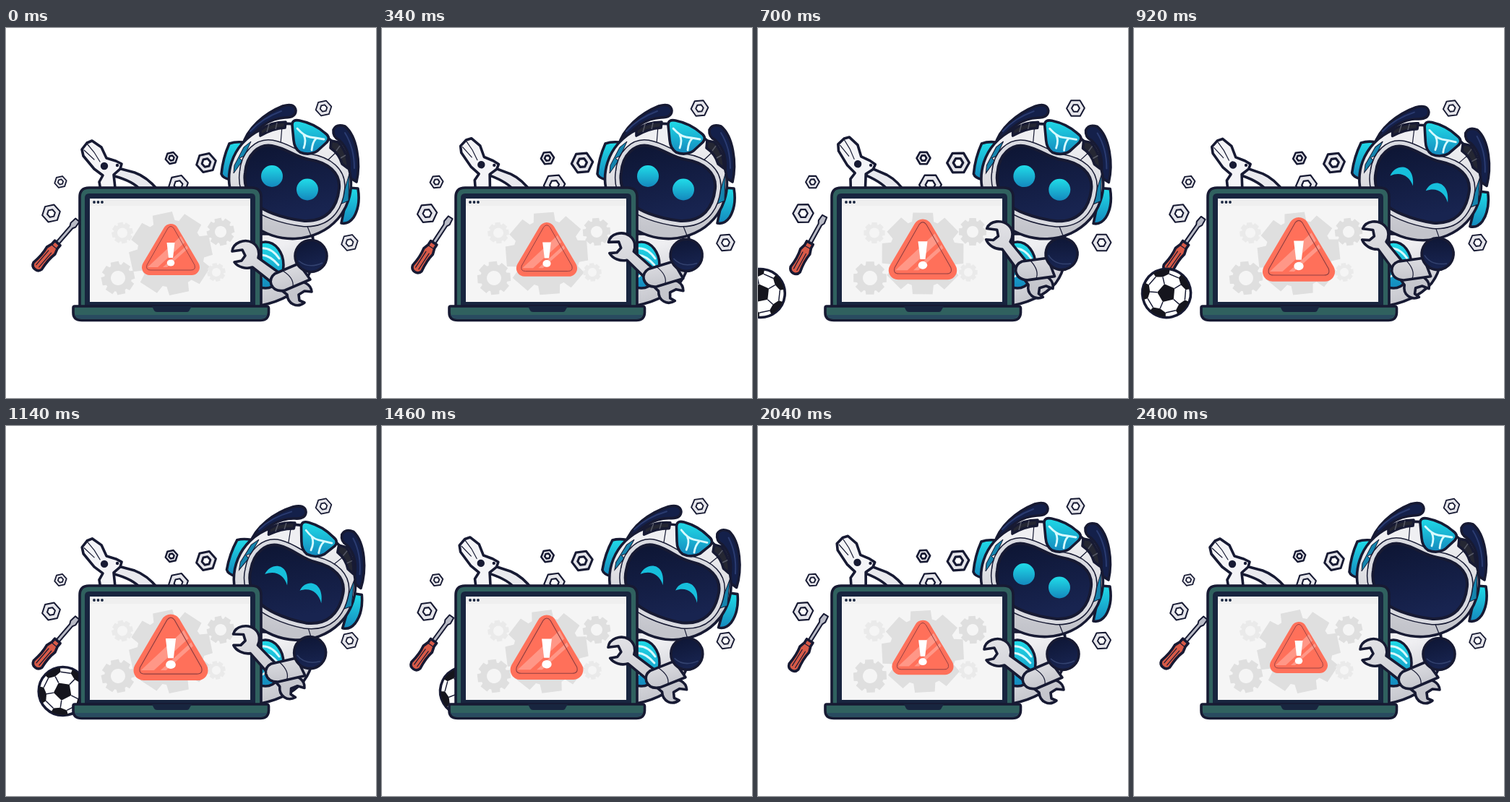
An HTML page that plays this animation: 512 px wide and 512 px high, repeating every 2420 ms.

```html
<!DOCTYPE html>
<html lang="en">
<head>
<meta charset="utf-8">
<style>
  html, body { margin: 0; width: 100%; height: 100%; overflow: hidden; background: #fff; }
  svg { display: block; width: 100vw; height: 100vh; }
  .ink { stroke: #171a33; stroke-width: 3.6; stroke-linejoin: round; stroke-linecap: round; }
  .thin { stroke-width: 2; }
  .line { fill: none; stroke: #171a33; stroke-width: 1.2; stroke-linecap: round; }
  .shine { fill: none; stroke: #d8fbff; stroke-width: 2.8; stroke-linecap: round; stroke-linejoin: round; }
</style>
</head>
<body>
<svg viewBox="0 0 512 512">
  <defs>
    <linearGradient id="cyan" x2="0" y2="1"><stop stop-color="#20dce8"/><stop offset="1" stop-color="#1488bd"/></linearGradient>
    <linearGradient id="shell" x2=".35" y2="1"><stop offset=".3" stop-color="#efeff2"/><stop offset="1" stop-color="#c3c4cb"/></linearGradient>
    <linearGradient id="steel" x2=".4" y2="1"><stop stop-color="#e4e4e8"/><stop offset="1" stop-color="#c4c5cc"/></linearGradient>
    <linearGradient id="navy" x2=".3" y2="1"><stop stop-color="#0d1533"/><stop offset="1" stop-color="#182450"/></linearGradient>
    <clipPath id="ballClip"><circle r="33"/></clipPath>
    <path id="face" d="M331 200C333 175 350 160 368 163C390 167 400 179 420 182C445 186 463 200 461 222C458 250 443 268 413 267C385 264 350 253 340 237C331 223 329 212 331 200Z"/>
  </defs>

  <g id="nuts"></g>

  <g id="driver">
    <path class="ink thin" fill="#b9bbc6" d="M0-2.500H31L35-4.500 44-3.500V3.500L35 4.500 31 2.500H0Z"/>
    <path class="ink" fill="#d85a48" d="M-40-7.500Q-24-5-12-7.500L-4-5H2V5H-4L-12 7.500Q-24 5-40 7.500Q-46 6-46 0Q-46-6-40-7.500Z"/>
    <path class="line" d="M-5-5V5M-40-2.500H-14M-40 2.500H-14"/>
  </g>

  <g id="pliers">
    <path class="ink" fill="#e9e9ee" d="M148 192L178 200Q195 206 210 224H186Q176 212 150 205Z"/>
    <path class="ink" fill="#f4f4f7" d="M112 159L119 156 132 165 139 180 152 184 160 188 158 195 149 203 152 230H132L129 213 134 204 122 195 107 177 105 168Z"/>
    <path class="line" d="M112 160L122 172 130 185M108 169L122 182"/>
    <circle cx="136" cy="191" r="5.2" fill="#171a33"/>
    <circle cx="154" cy="190" r="2.2" fill="#171a33"/>
  </g>

  <g id="ball">
    <circle r="33.5" fill="#fff" class="ink"/>
    <g clip-path="url(#ballClip)" id="patches" fill="#15151d"></g>
  </g>

  <path class="ink" fill="url(#shell)" d="M330 285H424Q431 328 412 353Q388 380 340 386Z"/>
  <ellipse class="ink" cx="359" cy="328" rx="25" ry="32" fill="url(#cyan)"/>
  <path class="shine" d="M352 305Q367 303 378 319M354 314Q366 315 377 328M355 344L364 337 374 341"/>

  <g id="head">
    <path class="ink" fill="#14204a" d="M327 164C333 139 358 118 383 108Q399 103 401 114Q401 124 386 124C365 125 345 139 336 157Z"/>
    <path class="ink" fill="#14204a" d="M453 141Q457 132 469 136C486 150 491 187 485 213L474 206C478 181 473 166 461 155Q452 151 453 141Z"/>
    <path fill="none" stroke="#2a3b70" stroke-width="2" stroke-linecap="round" d="M338 143Q354 125 381 115M469 145Q482 166 482 194"/>
    <path class="ink" fill="url(#cyan)" d="M309 160Q317 157 328 158L311 210Q300 208 298 202Q300 180 309 160Z"/>
    <path class="ink" fill="url(#cyan)" d="M474 221L487 222Q491 246 481 262Q474 272 464 270Z"/>
    <ellipse class="ink" cx="393" cy="212" rx="85" ry="79" transform="rotate(18 393 212)" fill="url(#shell)"/>
    <path fill="#1484ad" stroke="#171a33" d="M316 190L329 165 339 157 330 177 323 180 327 184 315 201ZM475 202L469 222 461 231 466 237 460 245 474 239Z"/>
    <path class="line" d="M382 136L380 160M460 169L443 185M416 272L424 292"/>
    <use href="#face" fill="none" stroke="#171a33" stroke-width="17" stroke-linejoin="round"/>
    <use href="#face" fill="none" stroke="#d9dae0" stroke-width="14" stroke-linejoin="round"/>
    <path class="ink" fill="#252733" d="M352 141Q366 130 387 130L386 138Q369 139 352 149Z"/>
    <path class="ink" fill="#252733" d="M450 156L460 158Q474 174 473 194L465 188Q461 174 449 166Z"/>
    <path d="M364 133L361 144M375 131L373 140M462 163L457 170M470 176L463 180" stroke="#555866" stroke-width="1.5"/>
    <path class="ink" fill="url(#cyan)" d="M396 134Q396 126 406 128Q426 132 441 145Q450 151 444 158L431 170Q420 177 407 172Q399 167 398 155Z"/>
    <path class="shine" d="M403 139Q413 150 421 151T440 154M412 148Q416 155 412 166M429 153Q424 158 423 169"/>
    <use href="#face" fill="url(#navy)" stroke="#171a33" stroke-width="4"/>
    <g id="roundEyes" fill="url(#cyan)"><circle cx="368" cy="205" r="15"/><circle cx="417" cy="223.5" r="15"/></g>
    <path id="happyEyes" fill="#16bfdc" d="M351 204C358 186 385 185 383 217C378 203 365 197 351 204ZM401 223C408 205 434 207 432 238C427 223 415 217 401 223Z"/>
  </g>

  <path class="ink" fill="#30615f" d="M102 389V234Q102 221 115 221H340Q353 221 353 234V389Z"/>
  <path fill="#18253f" d="M109 384V235Q109 229 115 229H340Q345 229 345 235V384Z"/>
  <path fill="#f5f5f5" d="M116 236H338V379H116Z"/>
  <path fill="#efefef" d="M116 236H338V246H116Z"/>
  <g fill="#18253f"><circle cx="122" cy="241" r="1.9"/><circle cx="127.5" cy="241" r="1.9"/><circle cx="133" cy="241" r="1.9"/></g>
  <g id="gears"></g>

  <g id="sign">
    <path d="M228 282L199 331H257Z" fill="#ff705a" stroke="#ff705a" stroke-width="22" stroke-linejoin="round"/>
    <path d="M196 331L242 288 247 297 210 331ZM217 331L250 301 252 305 223 331Z" fill="#fff" opacity=".27"/>
    <path d="M224 277Q228 272 232 277L261 328Q263 335 256 335H200Q193 335 195 328Z" fill="none" stroke="#8f3f42" stroke-width=".9"/>
    <path d="M222.5 297H233.5L231 318H225Z" fill="#fff"/>
    <ellipse cx="228" cy="325" rx="5.3" ry="4.6" fill="#fff"/>
  </g>

  <path class="ink" fill="#30615f" d="M95 385H361Q364 385 363.5 390V394Q363 404.500 352 404.500H105Q93 404.500 93 394V387Q93 385 95 385Z"/>
  <path fill="#294b60" d="M95 397H361Q358 402.500 352 402.500H105Q98 402.500 95 397Z"/>
  <path fill="#18253f" d="M202 385H257L253 392Q252 393 250 393H209Q206 393 205 391Z"/>

  <g id="arm">
    <path class="ink" fill="url(#steel)" d="M313 309C314 297 330 291 341 297C350 302 351 312 349 318L398 353C410 348 422 354 423 365L413 364 405 369 406 377 413 380C403 388 390 382 389 369L341 331C332 334 321 331 316 324L326 322 331 315 327 307Z"/>
    <path class="ink" fill="url(#steel)" d="M372 340L405 326 421 348 386 363Q372 366 367 355Q364 346 372 340Z"/>
    <path class="line" d="M383 336Q399 346 397 358"/>
    <circle class="ink" cx="422" cy="315.5" r="22" fill="url(#navy)"/>
    <path fill="none" stroke="#33426f" stroke-width="1.5" d="M405 322Q418 334 438 325"/>
  </g>
</svg>
<script>
const LOOP = 2420, TAU = Math.PI * 2;
const $ = id => document.getElementById(id);
const wave = p => (1 - Math.cos(TAU * p)) / 2;
const polar = (r, a) => `${(r * Math.cos(a)).toFixed(2)} ${(r * Math.sin(a)).toFixed(2)}`;
const polygon = (n, r, turn = 0) =>
  'M' + Array.from({ length: n }, (_, i) => polar(r, turn + i * TAU / n)).join('L') + 'Z';

function add(parent, markup) {
  $(parent).insertAdjacentHTML('beforeend', markup);
  return $(parent).lastElementChild;
}

function gearPath(r, hole) {
  const points = [];
  for (let i = 0; i < 8; i++) {
    const a = i * TAU / 8;
    points.push(polar(r * .8, a - .33), polar(r, a - .24), polar(r, a + .24), polar(r * .8, a + .33));
  }
  return 'M' + points.join('L') + 'Z' + (hole ? polygon(24, hole) : '');
}

// x, y, radius, hole, colour
const gears = [
  [228, 312, 58, 0, '#dfdfdf'], [161, 283.5, 15, 7, '#eaeaea'], [297, 282, 19.5, 8, '#dfdfdf'],
  [155, 346, 23.5, 10, '#dfdfdf'], [291, 338, 13, 6, '#eaeaea']
].map(([x, y, r, hole, fill]) => ({
  x, y, node: add('gears', `<path d="${gearPath(r, hole)}" fill="${fill}" fill-rule="evenodd"/>`)
}));

// x, y, radius, outline
const nuts = [
  [75.5, 213, 8, 1.7], [62.5, 256.5, 12, 1.9], [229, 180, 8, 2.3], [277, 186.5, 13, 2.8],
  [238.5, 217, 13, 2], [439.5, 111, 10.5, 1.7], [475.5, 297, 11, 1.7]
].map(([x, y, r, width]) => ({
  x, y, node: add('nuts', `<g stroke="#171a33" stroke-linejoin="round" stroke-width="${width}">
    <path d="${polygon(6, r)}" fill="#e6e6eb"/><path d="${polygon(6, r * .44)}" fill="#fff"/></g>`)
}));

const BALL_TURN = TAU / 10;
add('patches', `<path d="${polygon(5, 13, BALL_TURN)}"/>`);
for (let i = 0; i < 5; i++) {
  const a = BALL_TURN + i * TAU / 5;
  add('patches', `<path d="M${polar(23, a)}L${polar(27, a - .36)}L${polar(36, a - .36)}L${polar(36, a + .36)}L${polar(27, a + .36)}Z"/>`);
  add('patches', `<path d="M${polar(13, a)}L${polar(23, a)}M${polar(27, a + .36)}L${polar(27, a + TAU / 5 - .36)}" stroke="#171a33" stroke-width="1.5"/>`);
}

const pose = (node, value) => node.setAttribute('transform', value);
const show = (id, visible) => $(id).setAttribute('visibility', visible ? 'visible' : 'hidden');

function headTilt(t) {
  if (t < 605 || t > 1815) return 0;
  return 5.2 * (t < 1310 ? wave((t - 605) / 1410) : wave((1815 - t) / 1010));
}

function draw(t) {
  const sway = wave(2 * t / LOOP);
  pose($('driver'), `translate(${70 + sway} 299) rotate(${-49 - 13 * sway})`);
  pose($('pliers'), `rotate(${9 * sway} 156 204)`);
  nuts.forEach(n => pose(n.node, `translate(${n.x} ${n.y}) rotate(${-12 + 12 * sway}) scale(${1.05 + .14 * sway})`));
  gears.forEach(g => pose(g.node, `translate(${g.x} ${g.y}) rotate(${-12 + 13 * sway})`));

  const swell = 1 + .29 * wave(t / LOOP);
  pose($('sign'), `translate(228 307) scale(${swell}) translate(-228 -307)`);

  const lift = t < 1613 ? wave(t / 1613) : 0;
  pose($('arm'), `rotate(${16 * lift} 432 307)`);
  pose($('head'), `rotate(${headTilt(t)} 342 296)`);

  const left = Math.max(0, 2000 - t);
  const x = 137 - 7.9e-5 * left * left;
  pose($('ball'), `translate(${x} 367) rotate(${x / 33.5 * 360 / TAU})`);

  const happy = t >= 900 && t < 1815;
  show('happyEyes', happy);
  show('roundEyes', !happy && t < 2390);
}

const start = performance.now();
function tick() {
  draw((performance.now() - start) % LOOP);
  requestAnimationFrame(tick);
}
tick();
</script>
</body>
</html>
```
